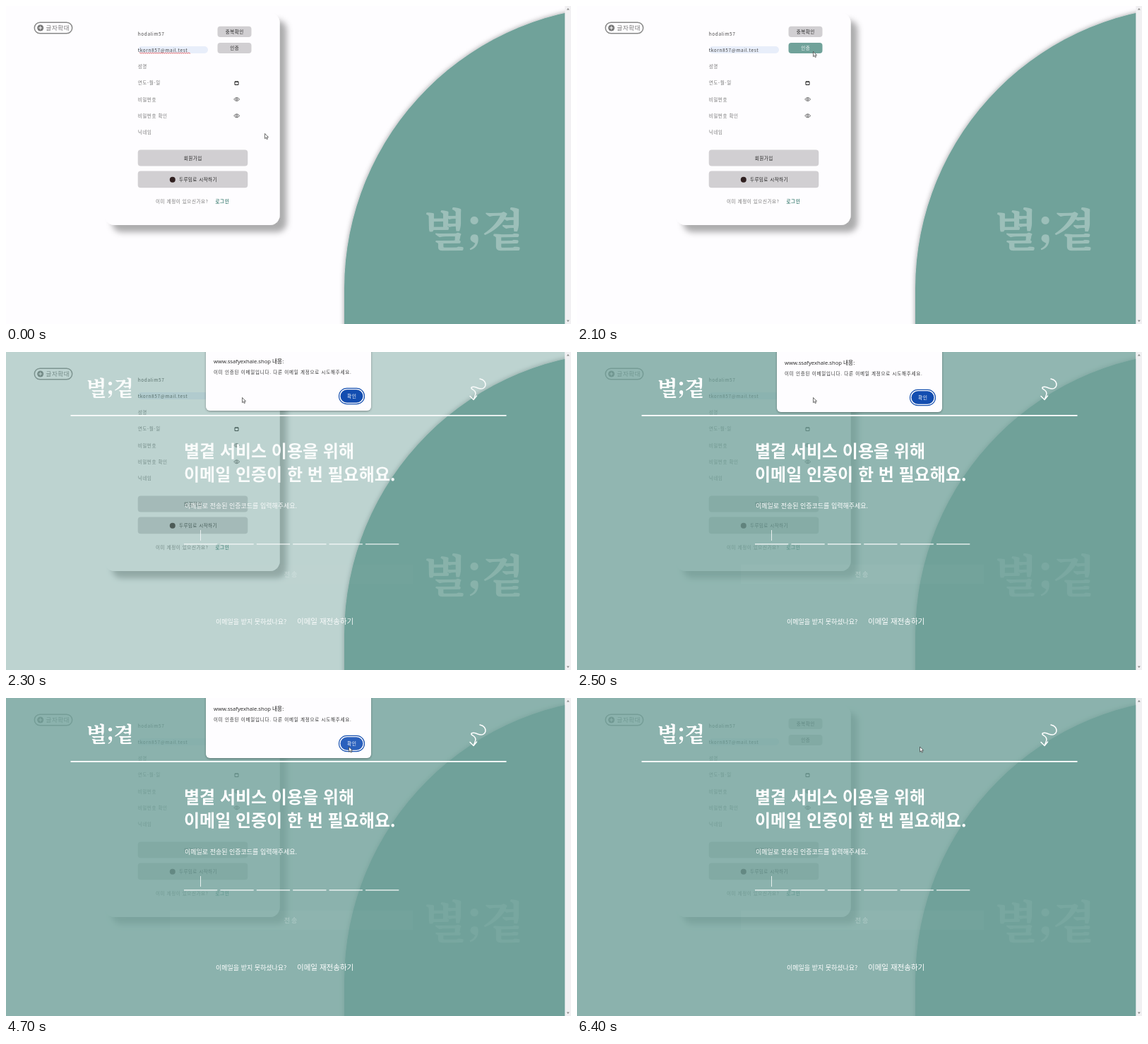
Write an HTML page that moves like this. It is 800 by 450 pixels and loops after 6600 ms.

```html
<!DOCTYPE html>
<html lang="ko">
<head>
<meta charset="utf-8">
<title>이메일 인증</title>
<style>
html, body { margin: 0; width: 100%; height: 100%; overflow: hidden; background: #fefdff; }
svg { display: block; width: 100vw; height: 100vh; }
text { font-family: "Noto Sans CJK KR", "Noto Sans CJK JP", "Noto Sans CJK", sans-serif; }
.field { font-size: 6.5px; letter-spacing: .6px; fill: #757575; }
.field.filled { fill: #444; }
.label { font-size: 6.5px; letter-spacing: .5px; fill: #222; text-anchor: middle; }
.button { fill: #d1cfd2; }
.logo text { font: 700 64px "Noto Serif CJK KR", "Noto Serif CJK JP", "Noto Sans CJK KR", serif; text-anchor: middle; }
.title { font-size: 24px; font-weight: 700; }
.note { font-size: 9px; font-weight: 500; }
</style>
</head>
<body>
<svg viewBox="0 0 800 450">
  <defs>
    <filter id="cardShadow" x="-10%" y="-10%" width="125%" height="125%">
      <feDropShadow dx="10" dy="10" stdDeviation="4.5" flood-color="#000" flood-opacity=".32"/>
    </filter>
    <filter id="softShadow" x="-10%" y="-10%" width="120%" height="130%">
      <feDropShadow dx="0" dy="0" stdDeviation="3.5" flood-color="#000" flood-opacity=".38"/>
    </filter>
    <filter id="dialogShadow" x="-10%" y="-10%" width="120%" height="130%">
      <feDropShadow dx="0" dy="1" stdDeviation="1.5" flood-color="#000" flood-opacity=".35"/>
    </filter>
    <g id="logo" class="logo">
      <text x="-41">별</text><text>;</text><text x="41">곁</text>
    </g>
    <g id="eye" fill="none" stroke="#444" stroke-width=".8">
      <path d="M-4 0Q0-5 4 0Q0 5-4 0Z"/><circle r="1.3"/>
    </g>
  </defs>

  <rect width="800" height="450" fill="#fefdff"/>
  <path d="M479 460V400A400 400 0 0 1 879 0V460Z" fill="#70a29a" filter="url(#softShadow)"/>
  <use href="#logo" transform="translate(663 340)" fill="#fff" opacity=".31"/>

  <rect x="40.3" y="23.2" width="53.4" height="15.6" rx="7.8" fill="none" stroke="#888" stroke-width="1.5"/>
  <circle cx="48.7" cy="31" r="4.5" fill="#777"/>
  <path d="M46.2 31h5M48.7 28.5v5" stroke="#fff"/>
  <text x="56.5" y="34.3" font-size="8.5" letter-spacing=".6" fill="#777">글자확대</text>

  <rect x="140" y="10" width="247.5" height="300" rx="14" fill="#fefdff" filter="url(#cardShadow)"/>
  <rect x="187" y="57" width="99" height="10" rx="5" fill="#e8eefa"/>
  <g id="fields"></g>
  <path id="spelling" fill="none" stroke="#d33" stroke-width=".8"/>
  <path d="M324 107h5v4.5h-5zM324 107.2h5" fill="none" stroke="#222"/>
  <use href="#eye" x="326.7" y="132"/>
  <use href="#eye" x="326.7" y="155.3"/>

  <rect class="button" x="299.5" y="28.7" width="48" height="15.3" rx="4"/>
  <text class="label" x="323.7" y="38.8">중복확인</text>
  <rect class="button" id="verify" x="299.5" y="52" width="48" height="15" rx="4"/>
  <text class="label" id="verifyLabel" x="323.7" y="62">인증</text>
  <rect class="button" x="186.7" y="203.6" width="155.6" height="23" rx="4"/>
  <text class="label" x="264.8" y="217.5">회원가입</text>
  <rect class="button" x="186.7" y="233.6" width="155.6" height="23.6" rx="4"/>
  <circle cx="235.8" cy="245.7" r="4" fill="#302020"/>
  <text class="label" x="272" y="247.8">두루밈로 시작하기</text>
  <text class="field" x="212" y="278.5">이미 계정이 있으신가요?</text>
  <text class="field" x="296.5" y="278.5" font-weight="700" style="fill:#4b877d">로그인</text>

  <rect id="veil" width="791.5" height="450" fill="#70a29a"/>
  <g id="overlay" fill="#fff">
    <use href="#logo" transform="translate(147.5 62) scale(.468)"/>
    <path d="M671 38C683 40 681 56 668 51C660 47 656 51 661 53C667 57 665 60 662 67M657 62.5l5 5 4.5-5.5"
      fill="none" stroke="#fff" stroke-width="1.5" stroke-linecap="round" stroke-linejoin="round"/>
    <rect x="91.5" y="89" width="617" height="1.8"/>
    <text class="title" x="252" y="149">별곁 서비스 이용을 위해</text>
    <text class="title" x="252" y="182">이메일 인증이 한 번 필요해요.</text>
    <text class="note" x="253" y="221">이메일로 전송된 인증코드를 입력해주세요.</text>
    <rect x="275" y="252" width=".8" height="15"/>
    <g id="slots"></g>
    <rect x="232" y="301" width="344" height="27" opacity=".025"/>
    <text x="404" y="317.7" font-size="9" letter-spacing="2" text-anchor="middle" opacity=".32">전송</text>
    <text class="note" x="297" y="384.8">이메일을 받지 못하셨나요?</text>
    <text x="412" y="384.8" font-size="10.5">이메일 재전송하기</text>
  </g>

  <g id="dialog">
    <path d="M283-12H517V79a6 6 0 0 1-6 6H289a6 6 0 0 1-6-6Z" fill="#fefdff" filter="url(#dialogShadow)"/>
    <text x="294" y="17.5" font-size="7.7" fill="#222" style="font-family:'Open Sans','Noto Sans CJK KR',sans-serif">www.ssafyexhale.shop 내용:</text>
    <text x="294" y="33" font-size="6.5" letter-spacing=".75" fill="#333">이미 인증된 이메일입니다. 다른 이메일 계정으로 시도해주세요.</text>
    <rect x="471.5" y="53.3" width="36" height="22.4" rx="11.2" fill="none" stroke="#1650b0" stroke-width="1.2"/>
    <rect id="confirm" x="473.5" y="55.2" width="32" height="18.6" rx="9.3"/>
    <text x="489.8" y="67" font-size="6.8" letter-spacing=".5" text-anchor="middle" fill="#fff">확인</text>
  </g>

  <rect x="791.3" width="8.7" height="450" fill="#f1f0f2"/>
  <path d="M793.8 5.5l2-2.5 2 2.5zM793.8 444.5l2 2.5 2-2.5z" fill="#8a8a8a"/>
  <path id="pointer" d="M0 0V7.2L1.7 5.7 2.8 8.2 4 7.6 2.9 5.2H5Z" fill="#fff" stroke="#333" stroke-width=".7"/>
</svg>
<script>
const LOOP = 6600, STEP = 100;
const OPEN = 2200, CLOSE = 6000;
const el = id => document.getElementById(id);
const set = (id, attrs) => {
  for (const name in attrs) el(id).setAttribute(name, attrs[name]);
};
const mix = (a, b, p) => a + (b - a) * p;
const progress = (t, from, to) => {
  const p = Math.min(1, Math.max(0, (t - from) / (to - from)));
  return p * p * (3 - 2 * p);
};

const fields = ["hodalim57", "tkorn857@mail.test", "성명", "연도-월-일", "비밀번호", "비밀번호 확인", "닉네임"];
el("fields").innerHTML = fields.map((text, i) =>
  `<text class="field ${i < 2 ? "filled" : ""}" x="186.7" y="${42 + i * 23.15}">${text}</text>`).join("");
el("slots").innerHTML = Array.from({ length: 6 }, (_, i) =>
  `<rect x="${252 + i * 51.4}" y="271.3" width="47.3" height="1.2"/>`).join("");
set("spelling", { d: "M189 66.6" + "q.75-1.2 1.5 0t1.5 0".repeat(24) });

// Values per step after opening; the last one holds.
const veilSteps = [.18, .46, .66, .77, .8, .81];
const textSteps = [.7, .92, 1];
const dialogSteps = [.25, 1];
const slideSteps = [-7, -2, 0];
const held = (steps, n) => n < 0 ? 0 : steps[Math.min(n, steps.length - 1)];

function draw(now) {
  const t = Math.floor(now % LOOP / STEP) * STEP;
  const n = (t - OPEN) / STEP;
  const toVerify = progress(t, 300, 1700);
  const toConfirm = progress(t, 3000, 4100);
  const x = mix(mix(366.5, 334.5, toVerify), 485.5, toConfirm);
  const y = mix(mix(180.5, 64.5, toVerify), 69, toConfirm);
  const hoverVerify = t < OPEN && y < 67;
  const closing = t >= CLOSE;

  set("pointer", { transform: `translate(${x} ${y})` });
  set("spelling", { opacity: t < 1900 ? 1 : 0 });
  set("verify", { style: hoverVerify ? "fill:#70a29a" : "" });
  set("verifyLabel", { style: hoverVerify ? "fill:#fff" : "" });
  set("veil", { opacity: held(veilSteps, n) });
  set("overlay", { opacity: held(textSteps, n) });
  set("dialog", {
    opacity: closing ? (t === CLOSE ? .4 : 0) : held(dialogSteps, n),
    transform: `translate(0 ${closing ? -4 : held(slideSteps, n)})`
  });
  set("confirm", { fill: x > 473 ? "#2a60bd" : "#134db0" });
}

function tick() {
  draw(performance.now());
  requestAnimationFrame(tick);
}
tick();
</script>
</body>
</html>
```
